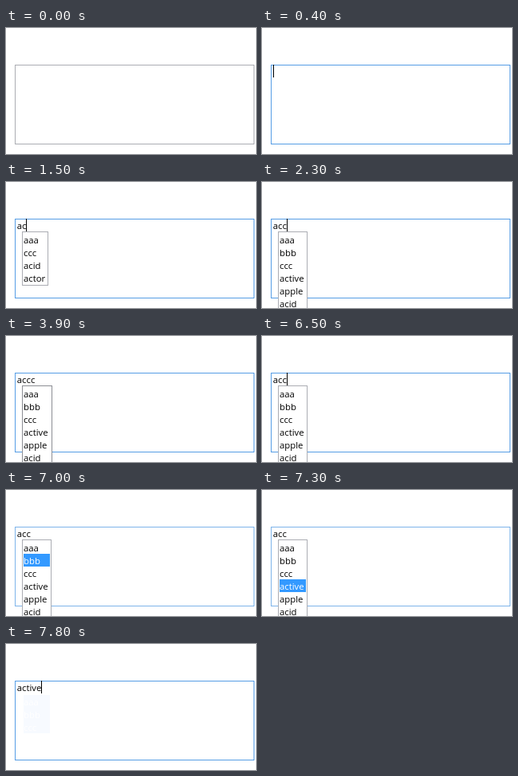
Animation, 313 px wide and 158 px high, one loop 8 s. Source, as an HTML page:

```html
<!DOCTYPE html>
<html lang="en">
<head>
<meta charset="utf-8">
<title>Autocomplete text box</title>
<style>
  html, body { margin: 0; width: 100%; height: 100%; overflow: hidden; background: #fff; }
  svg { display: block; width: 100%; height: 100%; }
  text { font: 11.33px "Open Sans", "Noto Sans", sans-serif; white-space: pre; }
</style>
</head>
<body>
<svg id="stage" viewBox="0 0 313 158">
  <rect id="box" x="11.5" y="46.5" width="299" height="99" fill="#fff"/>
  <text id="typed" x="13.8" y="59"/>
  <g id="ghost"></g>
  <g id="popup">
    <rect id="frame" x="20.5" y="62.5" fill="#fff"/>
    <g id="rows"></g>
  </g>
  <rect id="caret" y="46" width="1" height="16" fill="#000"/>
</svg>
<script>
const LOOP = 8000;
const ROW = 16;
const NORMAL = '#abadb3', HOVER = '#7eb4ea', FOCUS = '#569de5', SELECTED = '#3399ff';
const ALL = ['aaa', 'bbb', 'ccc', 'active', 'apple', 'acid'];

// Suggestions and popup size, by number of typed letters
const LISTS = [
  null,
  { items: ['aaa', 'ccc'], w: 25, h: 36 },
  { items: ['aaa', 'ccc', 'acid', 'actor'], w: 33, h: 68 },
  { items: ALL, w: 37, h: 132 },
  { items: ALL, w: 38, h: 148, edge: '#8c8e94' }
];

// Each step changes part of the state and holds until the next
const STEPS = [
  [0, { text: '', border: NORMAL, caret: false, sel: -1, open: true, ghost: false }],
  [100, { border: HOVER }],
  [400, { border: FOCUS, caret: true }],
  [800, { text: 'a' }],
  [1300, { caret: false }],
  [1500, { text: 'ac', caret: true }],
  [2000, { caret: false }],
  [2300, { text: 'acc', caret: true }],
  [2900, { caret: false }],
  [3300, { text: 'accc', caret: true }],
  [3900, { caret: false }],
  [4300, { caret: true }],
  [4800, { text: 'acccc' }],
  [5300, { caret: false }],
  [5400, { text: 'accc', caret: true }],
  [5600, { text: 'acc' }],
  [5900, { text: 'ac' }],
  [6400, { caret: false }],
  [6500, { text: 'acc', caret: true }],
  [6800, { border: HOVER, caret: false, sel: 0 }],
  [7000, { sel: 1 }],
  [7200, { sel: 2 }],
  [7300, { sel: 3 }],
  [7700, { text: 'active', border: FOCUS, caret: true, sel: -1, open: false, ghost: true }]
];

const ADVANCE = { a: 6.1, c: 5.53, t: 4.07, i: 2.9, v: 5.75, e: 6.28 };
const $ = id => document.getElementById(id);
const set = (el, attrs) => {
  for (const key in attrs) el.setAttribute(key, attrs[key]);
  return el;
};
const add = (parent, tag, attrs) =>
  parent.appendChild(set(document.createElementNS('http://www.w3.org/2000/svg', tag), attrs));

function makeRow(parent, i) {
  const y = 64 + i * ROW;
  return {
    bar: add(parent, 'rect', { x: 22, y, width: 33, height: ROW }),
    label: add(parent, 'text', { x: 22, y: y + 13 })
  };
}

function paintRow(row, text, bar, ink) {
  set(row.bar, { fill: bar });
  set(row.label, { fill: ink });
  row.label.textContent = text;
}

const rows = ALL.map((_, i) => makeRow($('rows'), i));
ALL.slice(0, 3).forEach((text, i) => paintRow(makeRow($('ghost'), i), text, '#f7faff', '#fff'));

const show = (id, on) => set($(id), { visibility: on ? 'visible' : 'hidden' });
const caretX = text => Math.floor([...text].reduce((x, ch) => x + ADVANCE[ch], 14));

function stateAt(time) {
  const state = {};
  for (const [start, change] of STEPS) if (start <= time) Object.assign(state, change);
  return state;
}

function render(time) {
  const s = stateAt(time);
  const list = s.open && LISTS[Math.min(s.text.length, 4)];
  set($('box'), { stroke: s.border });
  $('typed').textContent = s.text;
  set($('caret'), { x: caretX(s.text) });
  show('caret', s.caret);
  show('ghost', s.ghost);
  show('popup', list);
  if (!list) return;
  set($('frame'), { width: list.w - 1, height: list.h - 1, stroke: list.edge || NORMAL });
  rows.forEach((row, i) => {
    const on = i === s.sel;
    paintRow(row, list.items[i] || '', on ? SELECTED : 'none', on ? '#fff' : '#000');
  });
}

const begin = performance.now();
function tick() {
  render((performance.now() - begin) % LOOP);
  requestAnimationFrame(tick);
}
tick();
</script>
</body>
</html>
```
